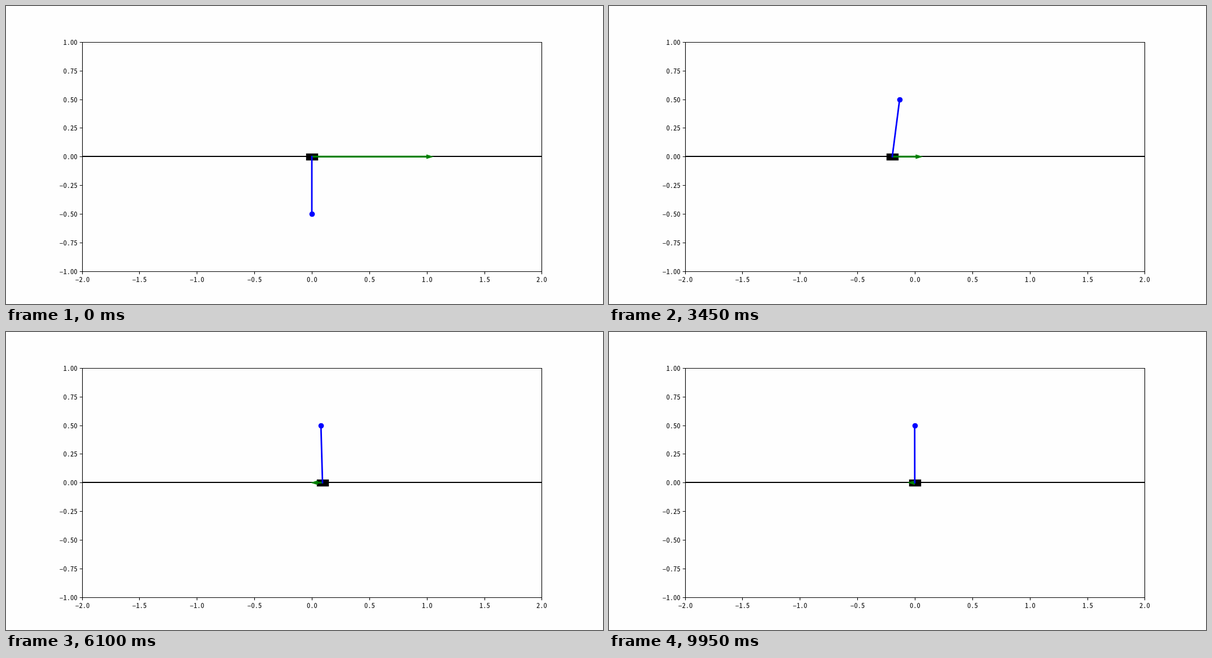
Animation, 1058 px wide and 529 px high, one loop 10 s. Source, as an HTML page:

```html
<!DOCTYPE html>
<html lang="en">
<head>
<meta charset="utf-8">
<title>Cart and pole</title>
<style>
  html, body { margin: 0; width: 100%; height: 100%; overflow: hidden; background: #fefefe; }
  svg { display: block; width: 1058px; height: 529px; }
  text { font: 12.5px "Noto Sans Mono CJK SC", "Noto Sans Mono CJK JP", "Liberation Mono", monospace; }
  .minus { font: 11.5px "Liberation Mono", monospace; }
  .axis { fill: none; stroke: #000; stroke-width: 1.11; }
  #rail { stroke: #000; stroke-width: 2.08; }
  #cart { stroke: #000; stroke-width: 1.39; }
  #force { fill: #008000; stroke: #008000; stroke-width: 1.39; stroke-miterlimit: 10; }
  #pole { stroke: #00f; stroke-width: 2.78; stroke-linecap: square; }
  #bob { fill: #00f; }
</style>
</head>
<body>
<svg viewBox="0 0 1058 529">
  <clipPath id="area"><rect x="135" y="64" width="815" height="407"/></clipPath>
  <g id="axes"></g>
  <g clip-path="url(#area)">
    <path id="rail" d="M135 267H950"/>
    <rect id="cart"/>
    <path id="force"/>
    <line id="pole"/>
    <circle id="bob" r="4.86"/>
  </g>
  <path class="axis" d="M135.5 64.5H949.5V471.5H135.5Z"/>
</svg>
<script>
const SCALE = 203.67, CX = 542, CY = 267.41;
const LOOP = 10000, STEP = 50, CATCH = 2.15;
const px = x => CX + SCALE * x;
const py = y => CY - SCALE * y;
const snap = v => Math.round(v) + 0.5;
const $ = id => document.getElementById(id);

function set(el, attrs) {
  for (const name in attrs) el.setAttribute(name, attrs[name]);
}

function label(value, digits, x, y, anchor) {
  const minus = value < 0 ? '<tspan class="minus">\u2212</tspan>' : '';
  return `<text x="${x}" y="${y}" text-anchor="${anchor}">${minus}${Math.abs(value).toFixed(digits)}</text>`;
}

function drawAxes() {
  let out = '';
  for (let i = -4; i <= 4; i++) {
    const x = snap(px(i / 2)), y = snap(py(i / 4));
    out += `<path class="axis" d="M${x} 471.5v4.8M135.5 ${y}h-4.8"/>`;
    out += label(i / 2, 1, x, 489.5, 'middle');
    out += label(i / 4, 2, 126.6, y + 4.6, 'end');
  }
  $('axes').innerHTML = out;
}

// Swing-up: turning points [time, value], joined by half cosines
const cartTurns = [[0, 0], [0.72, 0.7], [1.15, 0.55], [1.97, 1.6], [2.77, 0.855]];
const poleTurns = [[0, 0], [0.43, -0.8], [1.07, 1.35], [2.215, -2.765]];
// Pushes [start, first force, last force], each held until the next begins
const pushes = [[0, 1, 0.95], [0.33, -0.9, 0.45], [1.08, 1, 0.9], [1.68, -0.95, -0.42], [CATCH]];

function segment(list, t) {
  const i = list.findIndex(item => item[0] > t);
  const a = list[i - 1], b = list[i];
  return { a, b, u: (t - a[0]) / (b[0] - a[0]) };
}

function swing(turns, t) {
  const { a, b, u } = segment(turns, t);
  return a[1] + (b[1] - a[1]) * (1 - Math.cos(Math.PI * u)) / 2;
}

function push(t) {
  const { a, u } = segment(pushes, t);
  return a[1] + (a[2] - a[1]) * u;
}

// Balancing: the cart is a damped oscillator, lean and force follow its acceleration
function balance(t) {
  const damp = 0.62, omega = 1.4, s = t - 5.5;
  const amp = 0.181 * Math.exp(-damp * s);
  const sin = Math.sin(omega * s), cos = Math.cos(omega * s);
  const acc = amp * ((damp * damp - omega * omega) * sin - 2 * damp * omega * cos);
  const fade = tau => Math.exp((CATCH - t) / tau);
  return {
    x: amp * sin + 0.07 * fade(0.4) - 0.026 * Math.exp(-(((t - 3.4) / 0.9) ** 2)),
    angle: -Math.PI - acc / 10.5 + 0.2 * fade(0.25),
    force: 0.153 * acc - 0.08 * fade(0.25)
  };
}

function pose(t) {
  if (t >= CATCH) return balance(t);
  return { x: swing(cartTurns, t), angle: swing(poleTurns, t), force: push(t) };
}

function arrow(x, force) {
  const dir = force < 0 ? -1 : 1, neck = px(x + force);
  const tip = neck + dir * 0.05 * SCALE;
  const body = 0.005 * SCALE, head = 0.015 * SCALE;
  return `M${px(x)} ${CY - body}H${neck}V${CY - head}L${tip} ${CY}`
       + `L${neck} ${CY + head}V${CY + body}H${px(x)}Z`;
}

function draw(t) {
  const { x, angle, force } = pose(t);
  const bx = px(x + 0.5 * Math.sin(angle)), by = py(-0.5 * Math.cos(angle));
  const left = snap(px(x - 0.05)), right = snap(px(x + 0.05));
  const top = snap(py(0.025)), bottom = snap(py(-0.025));
  set($('cart'), { x: left, y: top, width: right - left, height: bottom - top });
  set($('force'), { d: arrow(x, force) });
  set($('pole'), { x1: px(x), y1: CY, x2: bx, y2: by });
  set($('bob'), { cx: snap(bx), cy: snap(by) });
}

drawAxes();
draw(0);
const start = performance.now();
function tick() {
  const ms = (performance.now() - start) % LOOP;
  draw(Math.floor(ms / STEP) * STEP / 1000);
  requestAnimationFrame(tick);
}
requestAnimationFrame(tick);
</script>
</body>
</html>
```
